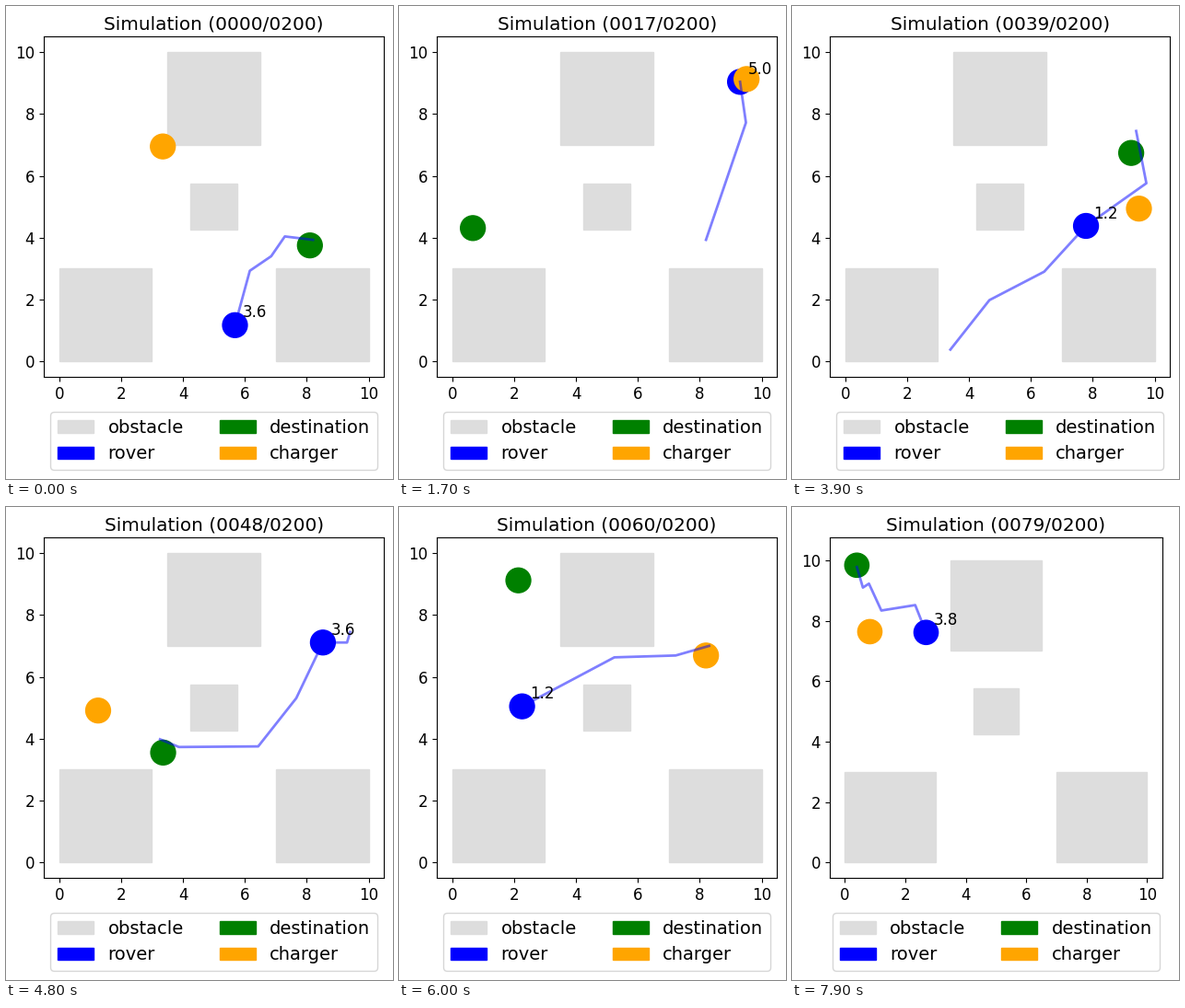
Recreate the animation shown at these times as a matplotlib script. Size 420x514 px, loop 8000 ms.

```python
import math

import matplotlib.pyplot as plt
from matplotlib.animation import FuncAnimation
from matplotlib.patches import Circle, Patch, Rectangle

W, H, DPI = 420, 514, 100
STEPS, TOTAL = 80, 200
LEFT, BOTTOM, SIDE = 40.85, 111.05, 369.6   # axes corner and height in pixels
RADIUS = 0.4
MAX_HOP = 2.1                               # longest move in one step
FULL, DRAIN, REACH = 5.0, 0.2, 1.0          # battery, use per step, charging range

COLORS = {"obstacle": "#dddddd", "rover": "blue",
          "destination": "green", "charger": "orange"}
OBSTACLES = [(0, 0, 3), (7, 0, 3), (3.5, 7, 3), (4.25, 4.25, 1.5)]

HOME = (5.68, 1.17)
# destination, charger, and the corners of each trip by its first step
ROUNDS = [
    ((8.1, 3.75), (3.35, 6.95),
     {0: [(6.16, 2.93), (6.85, 3.4), (7.29, 4.04), (8.2, 3.93)]}),
    ((0.67, 4.31), (9.51, 9.13),
     {9: [(9.49, 7.72), (9.3, 9.04)],
      20: [(6.2, 4.4), (5.2, 3.58), (0.79, 4.33)]}),
    ((3.49, 0.38), (5.01, 1.81),
     {27: [(2.6, 3.9), (3.45, 3.2), (3.74, 1.54), (3.4, 0.38)]}),
    ((9.24, 6.74), (9.49, 4.94),
     {36: [(4.66, 1.98), (6.43, 2.9), (7.78, 4.38), (9.73, 5.76), (9.4, 7.45)]}),
    ((3.36, 3.55), (1.26, 4.91),
     {46: [(9.3, 7.11), (8.52, 7.11), (7.66, 5.31), (6.43, 3.75), (3.87, 3.73),
           (3.26, 3.98)]}),
    ((2.14, 9.12), (8.2, 6.69),
     {58: [(1.26, 6.11), (2.1, 8.9)],
      60: [(5.24, 6.63), (7.22, 6.69), (8.3, 7.0)],
      73: [(5.4, 6.3), (3.0, 6.4), (2.38, 8.83)]}),
    ((0.4, 9.84), (0.83, 7.64),
     {79: [(2.33, 8.52), (1.21, 8.34), (0.8, 9.23), (0.6, 9.1), (0.4, 9.78)]}),
]


def split(start, corners):
    """Cut a route into equal hops on each leg, none longer than MAX_HOP."""
    path = [start]
    for corner in corners:
        a = path[-1]
        n = math.ceil(math.dist(a, corner) / MAX_HOP)
        path += [(a[0] + (corner[0] - a[0]) * k / n,
                  a[1] + (corner[1] - a[1]) * k / n) for k in range(1, n + 1)]
    return path


def simulate():
    """One hop per step; the battery drains unless the charger is in range."""
    trips = {step: (goal, charger, corners) for goal, charger, routes in ROUNDS
             for step, corners in routes.items()}
    rover, level, states = HOME, 3.6 + DRAIN, []
    for step in range(STEPS):
        if step in trips:
            begin = step
            goal, charger, corners = trips[step]
            path = split(rover, corners)
        rover = path[min(step - begin, len(path) - 1)]
        level = FULL if math.dist(rover, charger) < REACH else level - DRAIN
        states.append((rover, goal, charger, path, level))
    return states


def limits(values):
    lo, hi = min(values), max(values)
    pad = 0.05 * (hi - lo)
    return lo - pad, hi + pad


def fit_axes(points):
    """Fit the view to all shapes, keeping the height and a square unit."""
    (x0, x1), (y0, y1) = (
        limits([0, 10] + [p[k] + d for p in points for d in (-RADIUS, RADIUS)])
        for k in (0, 1))
    width = SIDE * (x1 - x0) / (y1 - y0)
    ax.set_position([LEFT / W, BOTTOM / H, width / W, SIDE / H])
    ax.set(xlim=(x0, x1), ylim=(y0, y1),
           xticks=range(0, 11, 2), yticks=range(0, 11, 2))


def draw(step):
    ax.clear()
    rover, goal, charger, path, level = STATES[step]
    for x, y, size in OBSTACLES:
        ax.add_patch(Rectangle((x, y), size, size, color=COLORS["obstacle"]))
    for name, pos in (("rover", rover), ("destination", goal), ("charger", charger)):
        ax.add_patch(Circle(pos, RADIUS, color=COLORS[name]))
    ax.plot(*zip(*path), color="blue", alpha=0.5, lw=2)
    ax.text(rover[0] + 0.25, rover[1] + 0.25, f"{level:.1f}")

    fit_axes([rover, goal, charger])
    ax.set_title(f"Simulation ({step:04d}/{TOTAL:04d})")
    ax.legend(handles=[Patch(color=c, label=n) for n, c in COLORS.items()],
              loc="upper center", bbox_to_anchor=(0.5, -0.0766), ncol=2, fontsize=14)
    return []


STATES = simulate()
plt.rcParams.update({"font.family": "DejaVu Sans", "font.size": 12})
fig = plt.figure(figsize=(W / DPI, H / DPI), dpi=DPI, facecolor="white")
ax = fig.add_axes([LEFT / W, BOTTOM / H, SIDE / W, SIDE / H])

anim = FuncAnimation(fig, draw, frames=STEPS, interval=100,
                     init_func=lambda: [], repeat=True, repeat_delay=0)
plt.show()
```
